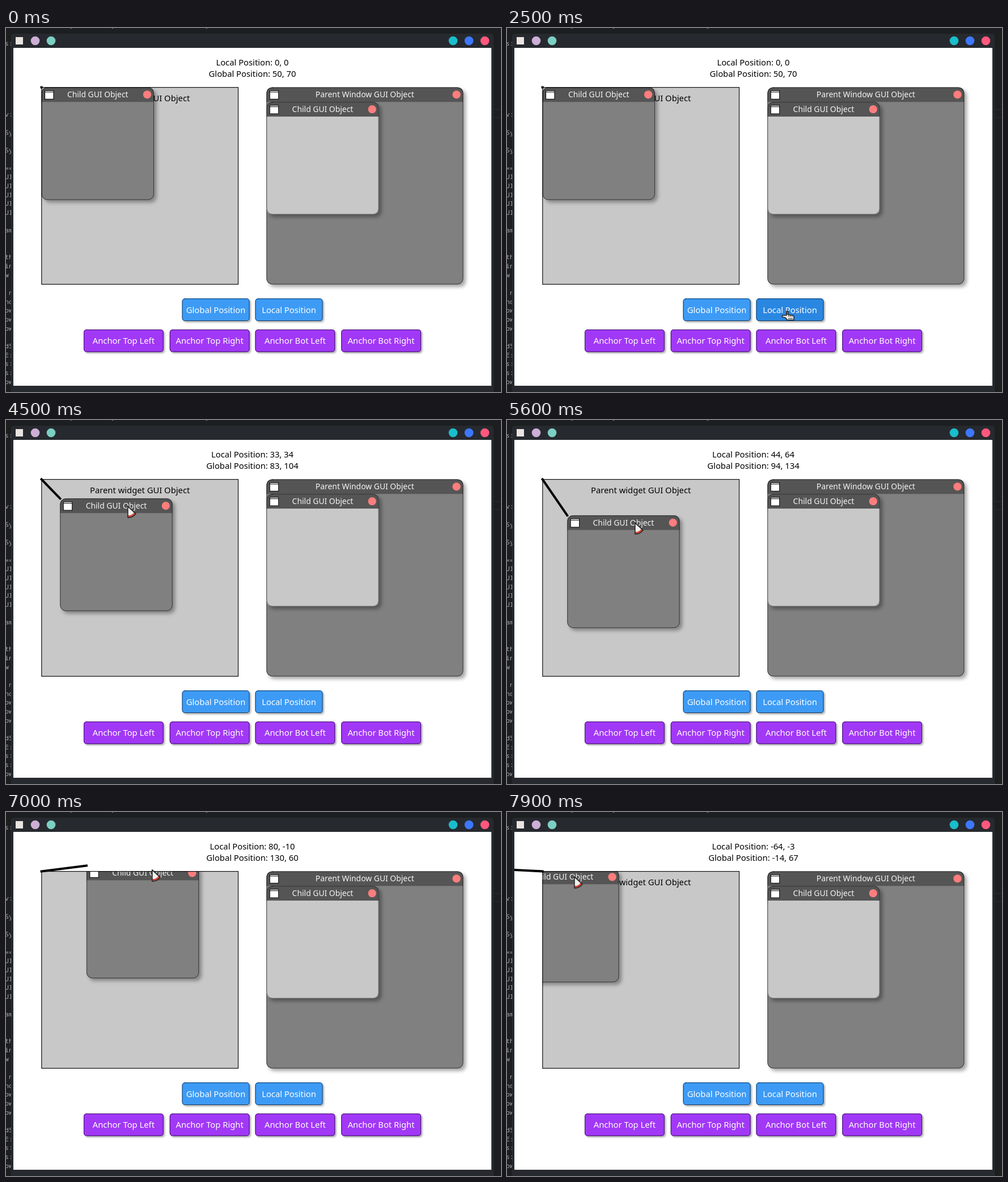
Animation, 873 px wide and 641 px high, one loop 8000 ms. Source, as an HTML page with a canvas:

```html
<!DOCTYPE html>
<html lang="en">
<head>
<meta charset="utf-8">
<title>Local and global positions</title>
<style>
html, body { margin: 0; width: 100%; height: 100%; overflow: hidden; background: #1c1e1f; }
canvas { display: block; }
</style>
</head>
<body>
<canvas id="stage" width="873" height="641"></canvas>
<script>
const ctx = document.getElementById('stage').getContext('2d');
const LOOP = 8000, TICK = 100, DRAG_START = 3900, POINTER_LEAD = 35;
const SCALE = 843 / 850; // the 850 x 600 window content is shown slightly reduced
const GRAY = '#808080', LIGHT = '#c8c8c8';

// Keys are [time, x, y]: pointer on the stage, then the dragged child's local position.
const pointerKeys = [
  [300, 798, 472], [1100, 542, 505], [1600, 502, 506], [2000, 502, 506],
  [2300, 525, 500], [2700, 453, 496], [2800, 453, 496],
  [3400, 310, 135], [3700, 181, 116], [3800, 180, 116]
];
const dragKeys = [
  [3900, 0, 0], [4500, 33, 34], [4600, 35, 37], [4700, 37, 52], [4800, 40, 45], [4900, 40, 45],
  [5000, 41, 45], [5100, 41, 45], [5600, 44, 64], [5800, 46, 69], [6000, 46, 69],
  [6600, 96, 30], [6900, 86, 9], [7000, 80, -10], [7300, 50, -55],
  [7800, -56, -5], [7900, -64, -3]
];
const buttons = [
  ['Global Position', 300, 445, 120, '#3d9bf5', '#123a63'],
  ['Local Position', 430, 445, 120, '#3d9bf5', '#123a63'],
  ['Anchor Top Left', 125, 500, 142, '#a138f6', '#3b1063'],
  ['Anchor Top Right', 278, 500, 142, '#a138f6', '#3b1063'],
  ['Anchor Bot Left', 430, 500, 142, '#a138f6', '#3b1063'],
  ['Anchor Bot Right', 583, 500, 142, '#a138f6', '#3b1063']
];
const codeRows = {
  0: 's:', 8: 'v:', 10: 'Sy', 12: 'Sy', 14: '==', 15: 'UI', 16: 'UI', 17: 'UI', 18: 'UI', 19: 'UI',
  21: 'am', 24: 'th', 25: 'in', 26: 'w ', 28: ' n', 29: 'nd', 30: 'ow', 31: 'ow', 32: 'ow',
  34: 'dS', 35: 'E:', 36: 's:', 37: 's:', 38: 'ow'
};

function sample(keys, t) {
  const next = keys.findIndex(k => k[0] > t);
  if (next < 0) return keys.at(-1).slice(1);
  if (next === 0) return keys[0].slice(1);
  const [a, b] = [keys[next - 1], keys[next]];
  const f = (t - a[0]) / (b[0] - a[0]);
  return [1, 2].map(i => a[i] + (b[i] - a[i]) * f);
}

function rect(x, y, w, h, color) {
  ctx.fillStyle = color;
  ctx.fillRect(x, y, w, h);
}

function circle(x, y, r, color) {
  ctx.fillStyle = color;
  ctx.beginPath();
  ctx.arc(x, y, r, 0, 7);
  ctx.fill();
}

function label(text, x, y, color, size = 14.9) {
  ctx.font = `${size}px "Noto Sans", sans-serif`;
  ctx.textAlign = 'center';
  ctx.fillStyle = color;
  ctx.fillText(text, x, y);
}

function roundBox(x, y, w, h, r, fill, shadow, blur, alpha) {
  ctx.save();
  ctx.beginPath();
  ctx.roundRect(x, y, w, h, r);
  ctx.shadowColor = `rgba(0,0,0,${alpha})`;
  ctx.shadowBlur = blur;
  ctx.shadowOffsetX = ctx.shadowOffsetY = shadow;
  ctx.fillStyle = fill;
  ctx.fill();
  ctx.restore();
}

function roundBorder(x, y, w, h, r, color) {
  ctx.strokeStyle = color;
  ctx.lineWidth = 1;
  ctx.beginPath();
  ctx.roundRect(x + 0.5, y + 0.5, w - 1, h - 1, r);
  ctx.stroke();
}

function guiWindow(title, x, y, size, fill) {
  roundBox(x, y, size, size, 10, fill, 4.5, 6, 0.35);
  ctx.save();
  ctx.clip();
  rect(x, y, size, 26, '#555');
  ctx.restore();
  roundBorder(x, y, size, size, 10, 'rgba(0,0,0,.6)');
  rect(x + 5.5, y + 5.5, 16.5, 16, '#000');
  rect(x + 6.5, y + 6.5, 14.5, 1.5, '#fff');
  rect(x + 6.5, y + 9, 14.5, 11.5, '#fff');
  label(title, x + size / 2, y + 18, '#f4f4f4', 14);
  circle(x + size - 12, y + 13, 7.2, '#ff7d7d');
}

function desktop() {
  rect(0, 0, 873, 641, '#1c1e1f');
  rect(860, 143, 13, 1, '#2a2c2e');
  rect(860, 157, 13, 1, '#2a2c2e');
  ctx.font = '11.5px "Noto Sans Mono", monospace';
  ctx.textAlign = 'left';
  ctx.fillStyle = '#a4abab';
  for (const row in codeRows) ctx.fillText(codeRows[row], -2, 31 + row * 15.68);
  for (const x of [113, 186, 352]) ctx.fillText('y', x, -2);
  ctx.fillStyle = '#262a2f';
  ctx.beginPath();
  ctx.roundRect(9, 10, 851, 640, 5);
  ctx.fill();
  rect(13, 35, 843, 595, '#fff');
  rect(17, 16, 13, 13, '#e9e5e2');
  circle(51.5, 22.5, 7.8, '#cdaed6');
  circle(79.5, 22.5, 7.8, '#7ccfc2');
  circle(788.5, 22.5, 7.8, '#1bbdcb');
  circle(816.5, 22.5, 7.8, '#3d78fc');
  circle(844.5, 22.5, 7.8, '#ff587c');
}

function widgets(lx, ly) {
  rect(50, 70, 350, 350, LIGHT);
  label('Parent widget GUI Object', 225, 95, '#000');
  ctx.save();
  ctx.beginPath();
  ctx.rect(50, 70, 350, 350);
  ctx.clip();
  guiWindow('Child GUI Object', 50 + lx, 70 + ly, 200, GRAY);
  ctx.restore();
  ctx.strokeStyle = '#000';
  ctx.lineWidth = 1.1;
  ctx.strokeRect(50.2, 70.2, 349.6, 349.6);

  ctx.lineWidth = 4;
  ctx.lineCap = 'square';
  ctx.beginPath();
  ctx.moveTo(50, 70);
  ctx.lineTo(50.01 + lx, 70 + ly);
  ctx.stroke();

  guiWindow('Parent Window GUI Object', 450, 70, 350, GRAY);
  guiWindow('Child GUI Object', 450, 96, 200, LIGHT);
  label(`Local Position: ${lx}, ${ly}`, 425, 31, '#000');
  label(`Global Position: ${lx + 50}, ${ly + 70}`, 425, 51, '#000');
}

function button([text, x, y, w, fill, border], hovered, pressed) {
  const face = pressed ? '#1f6dbd' : hovered ? '#2a87e1' : fill;
  roundBox(x, y, w, 40, 5, face, 2.5, 3, 0.3);
  roundBorder(x, y, w, 40, 4.5, border);
  label(text, x + w / 2, y + 25.5, '#fff');
}

const arrow = new Path2D('M.8 1 V20.8 Q9 21.5 15 14 Z');
const rind = new Path2D('M.8 17 Q8 17.5 12 11.5 L15 14 Q9 21.5 .8 20.8 Z');
const hand = new Path2D('M4 1 Q6 -1 7 2 V7 L15 8 Q17 8 17 10 V16 H5 L2 12 L-3 11 Q-5 8 -2 8 H4 Z');
const knuckles = new Path2D('M8 8 V11 M11 8 V11 M14 8 V11 M7 13.5 H15');

function pointer(x, y, overButton) {
  ctx.save();
  ctx.translate(x, y);
  ctx.lineCap = 'butt';
  ctx.lineJoin = 'round';
  ctx.lineWidth = 1.7;
  ctx.strokeStyle = '#2b2b2d';
  ctx.fillStyle = '#f1f0ee';
  ctx.fill(overButton ? hand : arrow);
  if (overButton) {
    rect(4, 1, 2, 6, '#d9503f');
    ctx.stroke(hand);
    ctx.lineWidth = 1;
    ctx.stroke(knuckles);
  } else {
    ctx.fillStyle = '#d64535';
    ctx.fill(rind);
    ctx.stroke(arrow);
  }
  ctx.restore();
}

function pointerAt(t) {
  if (t < DRAG_START) return sample(pointerKeys, t);
  // The dragged window trails the pointer a little.
  const [x, y] = sample(dragKeys, t + POINTER_LEAD);
  return [181 + x * SCALE, 116 + y * SCALE];
}

function draw(now) {
  const t = Math.floor(now % LOOP / TICK) * TICK;
  const [lx, ly] = sample(dragKeys, t).map(Math.round);
  const [px, py] = pointerAt(t).map(Math.round);
  const ux = (px - 13) / SCALE, uy = (py - 35) / SCALE;
  let overButton = false;

  desktop();
  ctx.save();
  ctx.beginPath();
  ctx.rect(13, 35, 843, 595);
  ctx.clip();
  ctx.translate(13, 35);
  ctx.scale(SCALE, SCALE);
  widgets(lx, ly);
  for (const b of buttons) {
    const [, x, y, w] = b;
    const hovered = t >= 300 && ux > x && ux < x + w && uy > y && uy < y + 40;
    overButton ||= hovered;
    button(b, hovered, hovered && t === 1800);
  }
  ctx.restore();
  if (t >= 300) pointer(px, py, overButton);
}

function loop() {
  draw(performance.now());
  requestAnimationFrame(loop);
}
loop();
</script>
</body>
</html>
```
